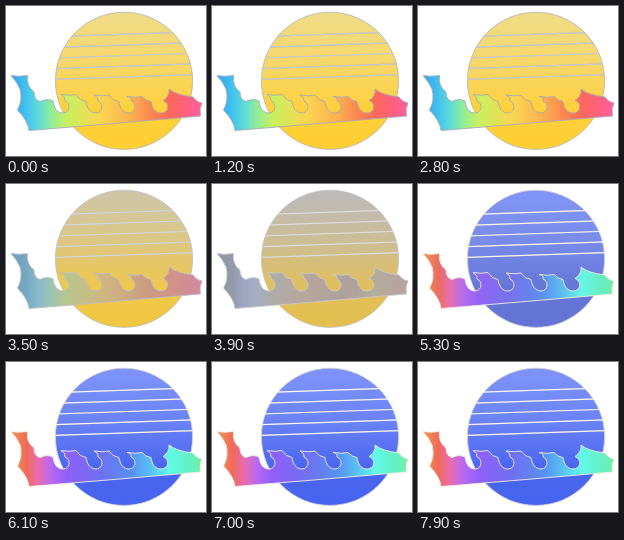
Recreate the animation shown at these times as an HTML page. Size 200x150 px, loop 8000 ms.

```html
<!DOCTYPE html>
<html lang="en">
<head>
<meta charset="utf-8">
<title>Sun and wave</title>
<style>
html, body { margin: 0; width: 100%; height: 100%; overflow: hidden; background: #fff; }
svg { display: block; width: 100vw; height: 100vh; }
</style>
</head>
<body>
<svg id="stage" viewBox="0 0 200 150">
  <defs>
    <linearGradient id="sunFill" gradientUnits="userSpaceOnUse" x1="0" y1="6" x2="0" y2="144"></linearGradient>
    <linearGradient id="bandFill" gradientUnits="userSpaceOnUse" x1="5" y1="0" x2="196" y2="0"></linearGradient>
    <clipPath id="disc"><circle cx="118" cy="74.8" r="68.9"/></clipPath>
  </defs>
  <circle id="sun" cx="118" cy="74.8" r="68.6" fill="url(#sunFill)" stroke-width=".8"/>
  <g id="stripes" clip-path="url(#disc)"></g>
  <path id="band" fill="url(#bandFill)" stroke-width=".9" stroke-linejoin="round"/>
</svg>
<script>
const LOOP = 8000;
const NS = 'http://www.w3.org/2000/svg';
const $ = id => document.getElementById(id);

function add(parent, tag, attrs) {
  const el = document.createElementNS(NS, tag);
  for (const k in attrs) el.setAttribute(k, attrs[k]);
  return parent.appendChild(el);
}

const rgb = hex => [0, 2, 4].map(i => parseInt(hex.substr(i, 2), 16));
function mix(a, b, p) {
  const to = rgb(b);
  return 'rgb(' + rgb(a).map((v, i) => Math.round(v + (to[i] - v) * p)) + ')';
}

// Piecewise linear value through [time, value] pairs
function track(keys, t) {
  if (t <= keys[0][0]) return keys[0][1];
  for (let i = 1; i < keys.length; i++) {
    const [t0, v0] = keys[i - 1], [t1, v1] = keys[i];
    if (t <= t1) return v0 + (v1 - v0) * (t - t0) / (t1 - t0);
  }
  return keys[keys.length - 1][1];
}

// The upper part of the sun and the band change before the lower part
const upper = [[2800, 0], [3900, .47], [4600, .79], [5300, .97], [6100, 1]];
const lower = [[3100, 0], [3900, .15], [4600, .56], [5300, .85], [6100, 1]];

// [offset, day colour, night colour]
const sunStops = [
  [0, 'eedc88', '7f94fa'],
  [.38, 'f7d768', '6b83f6'],
  [.72, 'ffd03a', '4a66f0'],
  [1, 'ffcf32', '4764f0']
];
const bandStops = [
  [.02, '34aaf0', 'f28c54'],
  [.08, '42c2ee', 'f06a58'],
  [.14, '5cdada', 'ea6cac'],
  [.21, '90ec98', 'b868f0'],
  [.29, 'c8f060', '9060fa'],
  [.47, 'f9d650', '7070f0'],
  [.63, 'fcb050', '5890f4'],
  [.73, 'fc8850', '58c0f4'],
  [.83, 'ff6858', '60fae8'],
  [.94, 'ff6088', '64f0c0'],
  [1, 'ff60a0', '70f0a4']
];

const makeStops = (id, list) => list.map(s => add($(id), 'stop', { offset: s[0] }));
const sunEls = makeStops('sunFill', sunStops);
const bandEls = makeStops('bandFill', bandStops);

// Five slanted slits with a pale core, cut off by the disc
const slits = [];
for (let i = 0; i < 5; i++) {
  const y = 30.2 + i * 10.7;
  const d = `M49 ${y + .4}L188 ${y - 4.4}`;
  slits.push(add($('stripes'), 'path', { d, 'stroke-width': 1.2 }));
  add($('stripes'), 'path', { d, stroke: '#fff', 'stroke-width': .4 });
}

// One curl: round hollow under an overhanging tip, then a back sloping to the next hollow
const curl = (x, y, next) =>
  `C${x - 7} 102 ${x - 4} 107 ${x + 2} 107 C${x + 9} 107 ${x + 10} 97 ${x + 4} 95` +
  `Q${x + 5} 91 ${x} ${y} Q${x + 9} ${y + 1.5} ${x + 15} ${y} Q${x + 19} 95 ${next - 8} 95.5`;

$('band').setAttribute('d',
  'M5 69.5Q12 71 21.5 69.5Q20 80 28 86Q28 94 34 95.5Q41 92 47 95' +
  curl(55, 88.5, 88) + curl(88, 89, 121) + curl(121, 90.5, 153) +
  'C146 102 149 107 155 107C163 107 164 97 157 94.5Q164 90 163 83' +
  'Q170 89 187 91Q190 96 196 97Q193 103 194.5 110' +
  'Q110 117.5 23 124.5Q22 115 11.5 104Q17 94 14 83Q11 76 5 69.5Z');

function paint(els, list, amount) {
  els.forEach((el, i) => {
    const [offset, day, night] = list[i];
    el.setAttribute('stop-color', mix(day, night, amount(offset)));
  });
}

function draw(ms) {
  const t = ms < 3200 ? Math.min(ms, 2800) : Math.floor(ms / 100) * 100;
  const a = track(upper, t), b = track(lower, t);
  paint(sunEls, sunStops, y => a + (b - a) * Math.min(1, y / .75));
  paint(bandEls, bandStops, () => a);
  const line = mix('a4abb8', 'f4ecdf', a);
  [$('band'), ...slits].forEach(el => el.setAttribute('stroke', line));
  $('sun').setAttribute('stroke', mix('b0b2b8', 'd2d0d2', a));
}

const start = performance.now();
function tick() {
  draw((performance.now() - start) % LOOP);
  requestAnimationFrame(tick);
}
tick();
</script>
</body>
</html>
```
